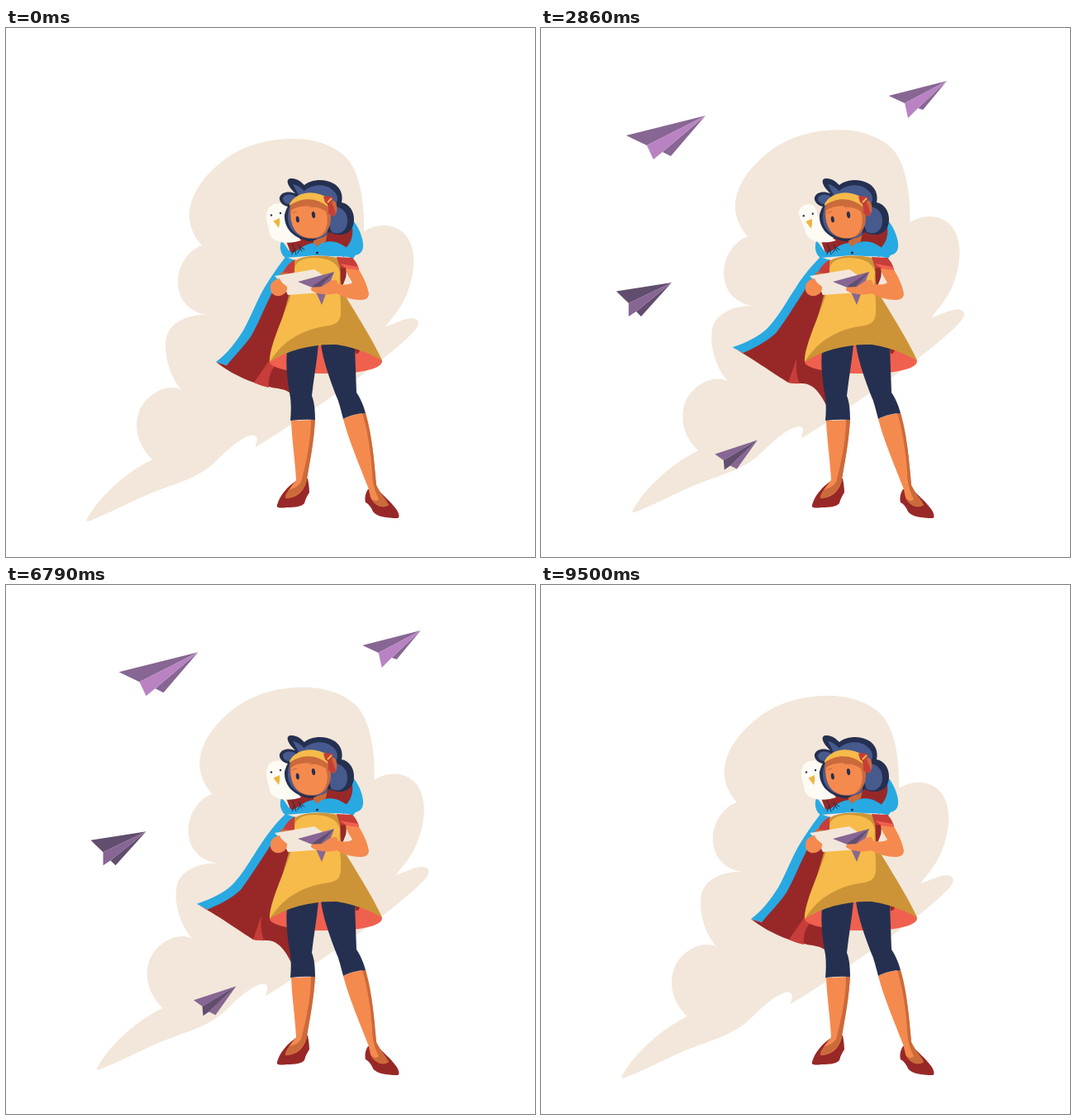
Animation of 640x640 px, one loop 9.57 s. Source, as an HTML page:

```html
<!DOCTYPE html>
<html lang="en">
<head>
<meta charset="utf-8">
<title>Paper planes</title>
<style>
html, body { margin: 0; width: 100%; height: 100%; overflow: hidden; background: #fff; }
svg { display: block; width: 100vw; height: 100vh; }
.skin { fill: #f58a4f } .shade { fill: #cb6a3a }
.navy { fill: #253050 } .hair { fill: #475a8e }
.gold { fill: #f6bb4a } .ochre { fill: #cd9437 }
.wine { fill: #982828 } .red { fill: #c73d39 } .coral { fill: #f0604f }
.blue { fill: #28a9e2 } .cream { fill: #f2e7da }
.line { fill: none; stroke: #253050; stroke-width: 1; stroke-linecap: round }
</style>
</head>
<body>
<svg viewBox="0 0 640 640">
  <path id="cloud" class="cream" d="M97 596C108 573 140 540 177 522C160 506 154 484 161 464C170 442 196 429 213 438C199 424 190 395 194 374C200 353 224 346 244 347C222 344 207 328 208 305C209 285 222 268 237 263C224 249 219 231 223 215C228 192 247 172 267 157C292 140 320 134 347 134C372 134 396 141 412 157C428 175 434 210 433 246C452 234 475 237 486 254C499 275 492 305 484 324C478 338 468 350 459 361C470 358 482 351 491 351C500 352 501 358 495 365C485 378 440 414 415 431C380 456 340 484 302 507C302 502 307 494 300 493C290 491 270 508 255 523C235 544 205 551 180 561C150 573 115 592 99 597Z"/>

  <g id="cape">
    <path class="wine"/>
    <path class="red"/>
    <path class="blue"/>
  </g>

  <g id="legs">
    <path class="coral" d="M319 404C340 388 370 382 400 383C430 386 455 396 455 403C455 414 420 419 385 418C350 418 320 412 319 404Z"/>
    <path class="wine" d="M421 384L428 389Q428 394 423 394Z"/>
    <path class="wine" d="M352 547C340 555 331 566 328 577C327 581 331 581 340 580C350 580 358 579 361 575C362 570 365 565 367 562C367 557 366 550 365 545Z"/>
    <path class="skin" d="M345 475L374 474C372 505 367 525 364 546C362 558 354 568 339 569C338 562 346 554 351 547C350 525 346 500 345 475Z"/>
    <path class="shade" d="M369 474H374C372 505 367 528 364 546C362 558 352 568 338 569C337 565 341 560 344 558C350 556 357 553 358 546C363 525 369 500 369 474Z"/>
    <path class="wine" d="M438 558C434 564 434 570 435 574C439 576 442 580 444 585C448 591 460 593 474 593C477 592 475 586 472 582C465 572 455 565 448 556Z"/>
    <path class="skin" d="M408 473C418 468 428 466 435 466C443 490 445 525 448 553C452 562 458 570 463 577C456 582 446 578 441 568C440 562 439 560 439 558C430 535 415 500 408 473Z"/>
    <path class="shade" d="M431 466H435C444 500 446 530 448 553C452 562 460 570 463 577C456 581 446 579 441 568C444 573 449 573 451 570C445 558 443 548 443 536C441 510 437 485 431 466Z"/>
    <path class="navy" d="M340 390C350 386 365 383 378 383C376 405 372 425 370 445C373 452 374 463 374 474Q360 473 344 475C345 465 345 455 344 447C341 430 338 410 340 390Z"/>
    <path class="navy" d="M381 383C395 382 410 383 422 385L424 441C429 448 433 458 435 466C426 466 415 469 408 473C405 462 403 452 399 444C392 425 384 404 381 383Z"/>
  </g>

  <g id="torso">
    <path class="wine" d="M398 284L412 290L411 308L404 313Z"/>
    <path class="red" d="M350 280C342 284 338 290 335 296L349 300Z"/>
    <path class="shade" d="M333 295L344 297L341 304L330 303Z"/>
    <path class="ochre" d="M349 282C360 274 390 274 403 279C406 295 403 308 408 320C425 348 445 380 455 402C445 397 427 387 400 383C370 382 340 390 319 404L349 300Z"/>
    <path class="gold" d="M349 292C350 283 358 278 372 278C390 278 402 284 404 296C402 310 406 330 405 345C404 356 400 359 385 361C355 366 333 381 319 404C318 385 338 345 345 322C348 310 349 300 349 292Z"/>
  </g>

  <g id="hood">
    <path class="wine" d="M338 255L390 252L392 264L376 270L345 274Z"/>
    <path class="blue" d="M417 230C426 238 433 255 432 265C431 274 424 276 414 275L408 277L400 270L408 262Z"/>
    <path class="wine" d="M386 247L414 240L418 234C421 247 419 259 411 266C404 261 396 260 388 262Z"/>
    <path class="shade" d="M372 250L389 247L387 258C383 260 379 263 376 266Q374 261 372 261Z"/>
    <path class="blue" d="M333 258C338 260 339 268 346 272C353 271 358 262 372 260Q375 262 376 265C381 259 391 256 402 260C412 264 416 271 424 273L420 279C412 275 402 277 392 276L376 275L338 278C331 273 331 263 333 258Z"/>
    <circle class="navy" cx="376.500" cy="272" r="1.600"/>
  </g>

  <g id="bird">
    <path fill="#fefbf5"/>
    <g>
      <circle class="navy" cx="321" cy="226.500" r="1.200"/>
      <circle class="navy" cx="332" cy="224" r="1.200"/>
      <path fill="#efb43f" d="M323.500 233.500L331 230Q332 236 330 242Z"/>
    </g>
    <path class="line" d="M346 261L349 267L346 274M349 267L351 274M354 262L356 267L353 272M356 267L358 270M356 265L361 268"/>
  </g>

  <g id="head">
    <path class="navy" d="M350 200C340 191 338 183 344 182C352 181 358 187 361 190C370 183 385 182 396 188C405 193 408 202 406 211C416 213 421 222 421 232C421 243 414 250 404 250C398 250 394 248 391 247L387 251C382 253 376 255 373 257C369 259 364 258 360 256C345 252 336 240 337 226C338 222 339 219 341 216C335 215 330 210 331 205C333 198 342 197 350 200Z"/>
    <path class="hair" d="M361 197C370 189 385 188 394 195C401 200 403 207 399 213L388 210L352 203Z"/>
    <path class="hair" d="M347 189C353 190 358 194 361 198L354 202Z"/>
    <path class="hair" d="M335 206C338 200 346 201 351 204L345 213C340 214 335 211 335 206Z"/>
    <path class="hair" d="M344 214C337 232 342 248 360 253C370 256 382 256 389 250L389 225Z"/>
    <path class="hair" d="M398 216C408 217 414 225 413 235C412 246 404 251 394 247L390 236Z"/>
    <path class="shade" d="M344 215C352 204 380 204 391 216C395 230 393 241 386 249C379 255 365 257 356 251C346 245 342 228 344 215Z"/>
    <path class="skin" d="M345 221C354 213 376 214 387 222C391 235 388 246 380 252C371 256 357 254 350 245C345 238 344 229 345 221Z"/>
    <ellipse class="shade" cx="395.500" cy="218" rx="5" ry="9.500"/>
    <path class="gold" d="M343 213C350 199 372 194 390 206L389 216C376 205 358 204 343 215Z"/>
    <path class="red" d="M384 204Q390 202 396 205L394 211L399 224L396 228L390 224L390 214L386 211Z"/>
    <path fill="none" stroke="#f6bb4a" stroke-width="1.800" d="M389 211L394 206"/>
    <ellipse class="navy" cx="352.800" cy="231.500" rx="2" ry="3.800" transform="rotate(-8 352.800 231.500)"/>
    <ellipse class="navy" cx="372" cy="226" rx="2.100" ry="4" transform="rotate(-8 372 226)"/>
    <path fill="none" stroke="#cb6a3a" stroke-width="1.100" d="M347 224Q349 222 352 222M367 217Q370 215 373 217"/>
  </g>

  <g id="arms">
    <path class="cream" d="M325 300L373 292L382 298L383 320L341 323L334 309Z"/>
    <path class="skin" d="M331 303C325 304 319 309 320 314C319 320 324 325 331 324C337 323 341 318 340 313L334 308L332 305Z"/>
    <path fill="#876693" d="M397 295L353 307L373 315L382 335Z"/>
    <path fill="#614d6e" d="M397 295L371 312L375 319Z"/>
    <path class="cream" d="M413 297L417 310L408 310Z"/>
    <path class="skin" d="M412 291L426 291C432 300 438 313 439 322C438 328 434 329 428 329C420 329 408 326 400 321C390 324 374 322 369 317C368 312 376 314 382 313C389 309 393 304 400 305L402 310C412 311 417 310 419 308C416 303 412 297 411 291Z"/>
    <path class="red" d="M400 277L419 278C424 283 426 288 427 292L404 290Z"/>
    <path class="coral" d="M404 285L426 289L427 293L412 291Z"/>
  </g>
  <g id="planes"></g>
</svg>
<script>
const $ = q => document.querySelector(q);
const clamp = x => Math.max(0, Math.min(1, x));
const ease = x => { x = clamp(x); return x * x * (3 - 2 * x); };

// Blend two paths that share the same commands.
function blend(a, b, k) {
  const nums = b.match(/[\d.]+/g);
  let i = 0;
  return a.replace(/[\d.]+/g, n => (+n + (nums[i++] - n) * k).toFixed(2));
}

const capeShapes = [
  ['M254 404L267 408L291 372L316 320L345 282L352 284L352 380L343 441C338 437 328 436 322 435L300 429C280 422 264 412 254 404Z',
   'M230 385L243 392L278 366L312 316L345 282L352 284L352 380L345 457C337 440 328 431 319 430L299 429C280 417 252 397 230 385Z'],
  ['M320 400L300 429C306 432 313 434 318 435Q316 418 328 406Z',
   'M308 401L299 429C303 430 308 430 312 430Q307 417 308 401Z'],
  ['M254 404C268 394 278 380 287 366C296 350 303 331 311 317C319 303 327 292 338 277L350 281C338 296 329 306 322 320C312 340 305 358 297 372C289 384 277 396 267 408Z',
   'M230 385C248 379 262 373 273 363C287 349 297 330 308 314C317 300 325 290 338 277L350 281C336 295 326 304 318 318C306 336 296 352 284 368C274 378 258 386 243 392Z']
];
const birdShape = [
  'M316 222C318 212 330 211 338 214C344 222 344 240 357 257C345 261 324 262 319 249C318 240 313 232 316 222Z',
  'M312 223C313 213 325 211 331 216C337 224 331 240 357 257C343 262 324 259 320 248C319 238 312 232 312 223Z'
];

const dark = '#614d6e', mid = '#876693', light = '#b983c3';
// pts, relative to the nose: wing tip, inner corner, keel, fold, far wing.
// gap: distance left at 1.93 s; stop and pow: arrival; out: exit speed.
const planes = [
  { x: 223, y: 89.5, gap: 77, stop: 4.03, pow: 2, out: 42.4, wing: mid, keel: light,
    pts: [[-96, 24], [-71, 36], [-63, 53], [-52, 44], [-42, 49]] },
  { x: 492.2, y: 63.3, gap: 29.2, stop: 3.6, pow: 4, out: 70.5, wing: mid, keel: light,
    pts: [[-70.5, 18], [-51, 27], [-47, 45], [-35, 33], [-29, 35]] },
  { x: 160, y: 306.6, gap: 38, stop: 3.4, pow: 3, out: 82, wing: dark, keel: mid,
    pts: [[-67, 10.5], [-52, 25], [-52, 41], [-43, 35], [-37, 41]] },
  { x: 269, y: 493.6, gap: 66, stop: 3.7, pow: 3, out: 51.7, wing: mid, keel: dark,
    pts: [[-51.5, 17], [-41, 24.5], [-40, 36], [-33, 31], [-25, 35]] }
];

for (const p of planes) {
  const [tip, inner, keel, fold, far] = p.pts;
  const part = (fill, ...pts) => `<polygon fill="${fill}" points="0,0 ${pts.join(' ')}"/>`;
  $('#planes').insertAdjacentHTML('beforeend',
    `<g>${part(p.wing, tip, inner)}${part(p.wing, fold, far)}${part(p.keel, inner, keel, fold)}</g>`);
  p.el = $('#planes').lastChild;
}

const fps = 14, frames = 134, loop = 9570;
const move = (el, x, y) => el.setAttribute('transform', `translate(${x.toFixed(2)} ${y.toFixed(2)})`);

function draw(ms) {
  const frame = Math.min(frames - 1, Math.floor(ms * fps / 1000 + 0.05));
  const t = frame / fps, u = frame / (frames - 1);

  const lift = 1 - Math.abs(2 * u - 1);
  move($('#cloud'), 22 * lift, -17.8 * lift);

  const sway = Math.pow(Math.abs(Math.sin(2 * Math.PI * u)), 1.35);
  capeShapes.forEach(([a, b], i) => $('#cape').children[i].setAttribute('d', blend(a, b, sway)));

  const turn = ease((t - 0.5) / 1.2) - ease((t - 4.5) / 1.5);
  const [body, face] = $('#bird').children;
  body.setAttribute('d', blend(...birdShape, turn));
  move(face, -3.2 * turn, 0.8 * turn);

  const drift = Math.max(0, Math.min(t, 7.14) - 3.4);
  const away = Math.pow(Math.max(0, t - 7.14), 3);
  for (const p of planes) {
    const left = p.gap * Math.pow(Math.max(0, p.stop - t) / (p.stop - 27 / fps), p.pow);
    move(p.el,
      p.x + 2.8 * drift - left + p.out * away,
      p.y - 2.45 * drift + 0.69 * left - 0.58 * p.out * away);
  }
}

const start = performance.now();
function tick() {
  draw((performance.now() - start) % loop);
  requestAnimationFrame(tick);
}
tick();
</script>
</body>
</html>
```
